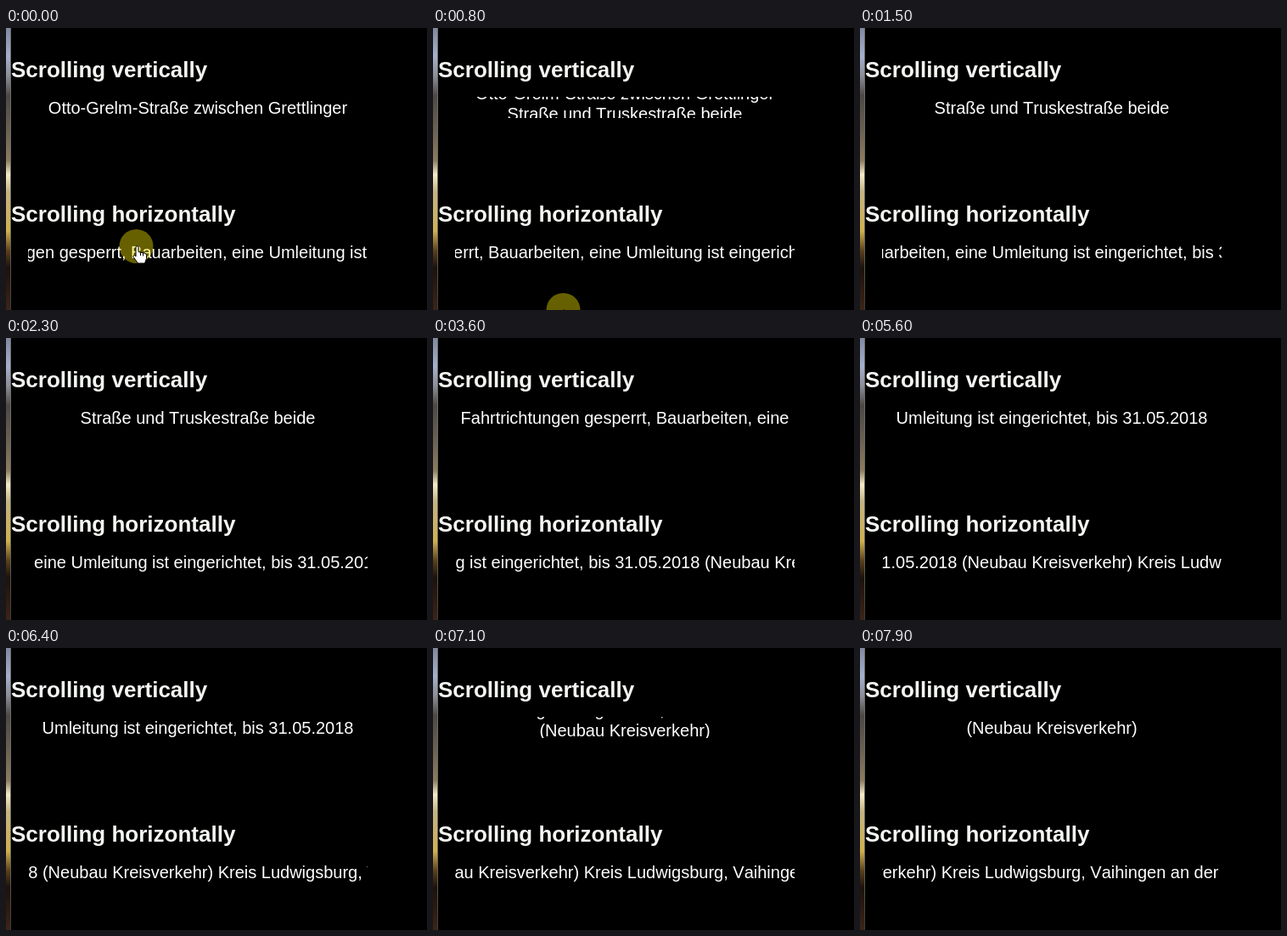
Write an HTML page that moves like this. It is 496x332 px and loops after 8 s.

```html
<!DOCTYPE html>
<html lang="de">
<head>
<meta charset="utf-8">
<title>Scrolling text</title>
<style>
  html, body { margin: 0; width: 100%; height: 100%; overflow: hidden; background: #000; }
  svg { display: block; width: 496px; height: 332px; }
  text { font: 20px "Liberation Sans", Arial, sans-serif; font-kerning: none; fill: #fff; white-space: pre; }
  .head { font-size: 26px; font-weight: bold; fill: #f4f6f2; }
  .row { text-anchor: middle; }
</style>
</head>
<body>
<svg viewBox="0 0 496 332">
  <defs>
    <linearGradient id="edge" x1="0" y1="0" x2="0" y2="1">
      <stop offset="0" stop-color="#8088a0"/>
      <stop offset=".1" stop-color="#a4b0cc"/>
      <stop offset=".17" stop-color="#8c8e98"/>
      <stop offset=".24" stop-color="#4c4844"/>
      <stop offset=".36" stop-color="#6a6052"/>
      <stop offset=".47" stop-color="#8c7c60"/>
      <stop offset=".52" stop-color="#f4ecc8"/>
      <stop offset=".58" stop-color="#c4b484"/>
      <stop offset=".72" stop-color="#d0b050"/>
      <stop offset=".79" stop-color="#5a401c"/>
      <stop offset=".85" stop-color="#1c120c"/>
      <stop offset="1" stop-color="#3c2418"/>
    </linearGradient>
    <linearGradient id="rim" x1="0" y1="0" x2="0" y2="1">
      <stop offset="0" stop-color="#b8b8bc"/>
      <stop offset=".75" stop-color="#b0a890"/>
      <stop offset="1" stop-color="#6c6058"/>
    </linearGradient>
    <clipPath id="rowClip"><rect x="26" y="81" width="400" height="25"/></clipPath>
    <clipPath id="lineClip"><rect x="26" y="250" width="400" height="30"/></clipPath>
  </defs>
  <rect width="496" height="332"/>
  <rect width="5" height="332" fill="url(#edge)"/>
  <rect x="5" width="1" height="332" fill="url(#rim)" fill-opacity=".6"/>
  <text class="head" x="6" y="58">Scrolling vertically</text>
  <text class="head" x="6" y="228">Scrolling horizontally</text>
  <g clip-path="url(#rowClip)"><g id="rows"></g></g>
  <g clip-path="url(#lineClip)"><text id="line" y="271"></text></g>
  <g id="pointer">
    <circle r="20" fill="#fff000" fill-opacity=".4"/>
    <g transform="translate(-1.500 -1)">
      <path d="M1 1.500q1.500-1.500 3 0v6l8 1.800q1.500.7 1.500 2.200v4l-2 5.500h-8l-5.500-7.500q-.5-2 1.500-2l1.500 1.500z"
            fill="#fff" stroke="#000"/>
      <path d="M6.500 8v4M9.500 9v3.500" stroke="#000" fill="none"/>
    </g>
  </g>
</svg>
<script>
const LOOP = 8000, STEP = 100;
const ROW_HEIGHT = 24, ROW_START = 160, ROW_PERIOD = 2050, ROW_MOVE = 1000;

const rows = [
  'Otto-Grelm-Straße zwischen Grettlinger',
  'Straße und Truskestraße beide',
  'Fahrtrichtungen gesperrt, Bauarbeiten, eine',
  'Umleitung ist eingerichtet, bis 31.05.2018',
  '(Neubau Kreisverkehr)'
];
const ticker = rows.slice(2).join(' ') + ' Kreis Ludwigsburg, Vaihingen an der';

// [time, left end of the ticker]; close to a steady 100 px/s
const path = [[0, -83], [1500, -237], [2300, -316], [3600, -445],
              [4900, -577], [6400, -722], [7900, -876]];

const get = id => document.getElementById(id);
const clamp = v => Math.min(1, Math.max(0, v));
const swing = p => (1 - Math.cos(Math.PI * clamp(p))) / 2;

rows.forEach((words, i) => {
  const el = document.createElementNS('http://www.w3.org/2000/svg', 'text');
  el.setAttribute('class', 'row');
  el.setAttribute('x', 226);
  el.setAttribute('y', 101 + i * ROW_HEIGHT);
  el.textContent = words;
  get('rows').append(el);
});
get('line').textContent = ticker;

function along(points, t) {
  const i = Math.max(1, points.findIndex(p => p[0] >= t));
  const [t0, x0] = points[i - 1], [t1, x1] = points[i];
  return x0 + (x1 - x0) * (t - t0) / (t1 - t0);
}

function rowShift(t) {
  let sum = 0;
  for (let i = 0; i < rows.length - 1; i++) {
    sum += swing((t - ROW_START - i * ROW_PERIOD) / ROW_MOVE);
  }
  return Math.round(sum * ROW_HEIGHT);
}

function draw(t) {
  get('rows').setAttribute('transform', `translate(0 ${-rowShift(t)})`);
  get('line').setAttribute('x', Math.round(along(path, t)));
  const leave = clamp((t - 200) / 900);
  get('pointer').setAttribute('transform', `translate(153.5 ${257 + 100 * swing(leave)})`);
}

let start;
function tick(now) {
  start ??= now;
  const t = (now - start + 1) % LOOP;
  draw(Math.floor(t / STEP) * STEP);
  requestAnimationFrame(tick);
}
draw(0);
requestAnimationFrame(tick);
</script>
</body>
</html>
```
